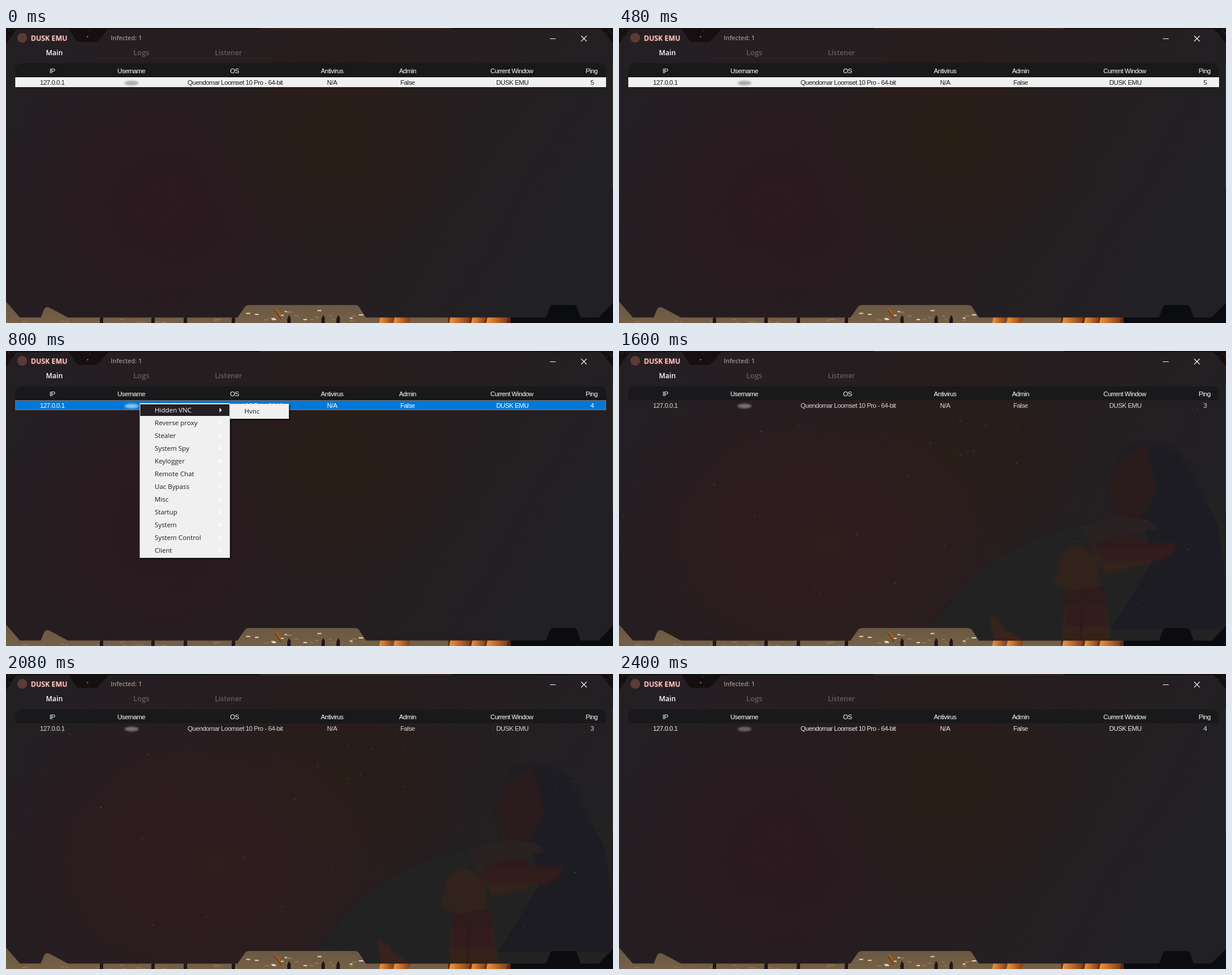
Write an HTML page that moves like this. It is 1049 by 509 pixels and loops after 3.2 s.

```html
<!DOCTYPE html>
<html lang="en">
<head>
<meta charset="utf-8">
<title>Client list</title>
<style>
html, body { margin: 0; width: 100%; height: 100%; overflow: hidden; background: #15100f; }
svg { display: block; width: 1049px; height: 509px; }
text { white-space: pre; }
.cell { font: 11.3px "Liberation Sans", Arial, sans-serif; text-anchor: middle; letter-spacing: -0.5px; }
.tab { font: 600 12px "Open Sans", sans-serif; }
.item { font: 11.3px "Open Sans", sans-serif; }
</style>
</head>
<body>
<svg id="stage" viewBox="0 0 1049 509" xmlns="http://www.w3.org/2000/svg">
  <defs>
    <linearGradient id="base" x1="0" y1=".35" x2="1" y2=".65">
      <stop offset="0" stop-color="#241f23"/>
      <stop offset=".4" stop-color="#261c1f"/>
      <stop offset=".62" stop-color="#251e20"/>
      <stop offset="1" stop-color="#212125"/>
    </linearGradient>
    <radialGradient id="plum"><stop stop-color="#2b1920"/><stop offset=".55" stop-color="#2a1a20" stop-opacity=".7"/><stop offset="1" stop-color="#261d21" stop-opacity="0"/></radialGradient>
    <radialGradient id="umber"><stop stop-color="#291e14"/><stop offset=".5" stop-color="#291d19" stop-opacity=".7"/><stop offset="1" stop-color="#261e1d" stop-opacity="0"/></radialGradient>
    <radialGradient id="wine"><stop stop-color="#301d1e"/><stop offset=".6" stop-color="#2d1d1e" stop-opacity=".7"/><stop offset="1" stop-color="#281e20" stop-opacity="0"/></radialGradient>
    <linearGradient id="skin" x2="0" y2="1"><stop stop-color="#2c1f1e"/><stop offset="1" stop-color="#362019"/></linearGradient>
    <linearGradient id="ember"><stop stop-color="#e99643"/><stop offset=".45" stop-color="#c26a28"/><stop offset="1" stop-color="#7b3b1b"/></linearGradient>
    <linearGradient id="town" x2="0" y2="1"><stop stop-color="#655541"/><stop offset="1" stop-color="#766047"/></linearGradient>
    <filter id="soft" x="-30%" y="-60%" width="160%" height="220%"><feGaussianBlur stdDeviation="1.6"/></filter>
    <filter id="haze"><feGaussianBlur stdDeviation="2"/></filter>
    <filter id="glow" x="-20%" y="-60%" width="140%" height="220%"><feDropShadow dx="0" dy="0" stdDeviation="1.8" flood-color="#c02a20"/></filter>
    <filter id="drop" x="-5%" y="-5%" width="115%" height="120%"><feDropShadow dx="2" dy="2" stdDeviation="1" flood-color="#000" flood-opacity=".6"/></filter>
    <path id="frame" d="M18 2 0 28V472L24 499.500H60L66 485Q70 479 76 483L107 499.500H400L413 481Q415 478 419 478H604Q608 478 610 481L622 499.500H933L940 482Q941 478 946 478H981Q985 478 987 482L993 499.500H1024L1049 474V27L1028 2H177L160 21Q158 24 154 24H127Q123 24 121 21L109 2Z"/>
    <clipPath id="inside"><use href="#frame"/></clipPath>
  </defs>
  <g id="scene"></g>
  <g clip-path="url(#inside)">
    <rect width="1049" height="509" fill="url(#base)"/>
    <ellipse cx="270" cy="300" rx="280" ry="260" fill="url(#plum)"/>
    <ellipse cx="570" cy="190" rx="250" ry="240" fill="url(#umber)"/>
    <g id="art">
      <ellipse cx="360" cy="330" rx="360" ry="290" fill="url(#wine)"/>
      <g filter="url(#haze)">
        <path d="M540 480Q650 310 830 300L950 240 1049 260V509H540Z" fill="#222124"/>
        <path d="M862 190Q872 150 925 158 980 165 1000 235L1035 300 1049 400V480H850L925 360 905 290Z" fill="#1f1e21"/>
        <path d="M866 186 910 162 930 240 900 292 858 283 846 240Z" fill="#2c1f1e"/>
        <path d="M815 335Q830 310 880 312L915 330 960 332Q965 352 930 362L840 385Z" fill="url(#skin)"/>
        <path d="M798 305Q850 280 915 292L935 306 840 325 815 340Z" fill="#292021"/>
        <path d="M752 400 764 350Q778 332 800 338L828 358 832 410 790 420Z" fill="#31201c"/>
        <path d="M770 416 838 404 850 500H766Z" fill="url(#skin)"/>
        <path d="M801 420 798 500" stroke="#261c1d" stroke-width="3"/>
        <path d="M641 460Q657 456 667 480L698 500H648Z" fill="#39241b"/>
      </g>
      <g id="stars"></g>
    </g>
  </g>
  <path d="M1048.5 60V275" stroke="#49392b"/>
  <path d="M157 51.5H458" stroke="#292427" stroke-dasharray="8 2"/>
  <circle cx="28" cy="17" r="8.5" fill="#5c3a38"/>
  <text class="tab" x="43" y="22" fill="#f6e4e2" filter="url(#glow)" letter-spacing=".15">DUSK EMU</text>
  <text class="tab" x="181" y="21" fill="#a78f8a" style="font-size:10.6px">Infected: 1</text>
  <text class="tab" x="69" y="47" fill="#fff">Main</text>
  <text class="tab" x="220" y="47" fill="#635e60" style="font-size:12.6px">Logs</text>
  <text class="tab" x="361" y="47" fill="#635e60">Listener</text>
  <path d="M940 18.5H950M994 13.5 1003.500 23M1003.500 13.500 994 23" stroke="#f4f4f4" stroke-width="1.1" fill="none"/>
  <path d="M16 85V73Q16 61 28 61H1025Q1037 61 1037 73V85Z" fill="#19181a"/>
  <g id="heads" fill="#fff"></g>
  <rect id="bar" x="16" y="85" width="1021" height="17"/>
  <rect id="focus" x="16.5" y="85.5" width="1020" height="16" fill="none" stroke="#ff8728" stroke-dasharray="1 1"/>
  <ellipse id="smudge" cx="217" cy="95" rx="12" ry="4" filter="url(#soft)"/>
  <g id="cells"></g>
  <g id="menu"></g>
</svg>
<script>
const $ = id => document.getElementById(id);
const NS = "http://www.w3.org/2000/svg";

function add(parent, tag, attrs, label) {
  const el = document.createElementNS(NS, tag);
  for (const key in attrs) el.setAttribute(key, attrs[key]);
  if (label !== undefined) el.textContent = label;
  parent.appendChild(el);
  return el;
}

const box = (parent, x, y, width, height, fill) =>
  add(parent, "rect", { x, y, width, height, fill });

function seeded(seed) {
  return () => (seed = seed * 16807 % 2147483647) / 2147483647;
}

function drawScene() {
  const g = $("scene"), rnd = seeded(71);
  box(g, 0, 0, 1049, 509, "#15100f");
  box(g, 440, 0, 330, 2, "#30231a");
  box(g, 0, 465, 768, 44, "url(#town)");
  for (let i = 0; i < 22; i++)
    box(g, 415 + rnd() * 195, 484 + rnd() * 22, 3 + rnd() * 6, 2, i % 2 ? "#8c765a" : "#e6d6b4");
  for (let i = 0; i < 14; i++)
    box(g, rnd() * 400, 501 + rnd() * 7, 4 + rnd() * 9, 1.5, "#8f7759");
  for (const x of [165, 254, 310, 393, 489, 548, 574])
    add(g, "path", { d: `M${x - 3} 509V502L${x} 495 ${x + 3} 500V509Z`, fill: "#201719" });
  add(g, "path", { d: "M463 485 468 484 475 493 474 502 467 494Z", fill: "#9d5b20" });
  add(g, "path", { d: "M464 486 475 502", stroke: "#2a1b18" });
  const toes = (x, w) => add(g, "path", { d: `M${x} 499H${x + w}L${x + w - 3} 509H${x - 2}Z`, fill: "url(#ember)" });
  toes(647, 24);
  toes(672, 27);
  box(g, 764, 499, 108, 10, "#5d2a17");
  toes(768, 35);
  toes(806, 24);
  toes(832, 36);
  box(g, 872, 470, 177, 39, "#0b0c10");
  for (let i = 0; i < 9; i++)
    add(g, "circle", { cx: i < 5 ? rnd() * 16 : 1030 + rnd() * 18, cy: rnd() * 20, r: .8, fill: "#574a43" });
  add(g, "circle", { cx: 141, cy: 15, r: 1.3, fill: "#77706c" });
  add(g, "circle", { cx: 145, cy: 5, r: .8, fill: "#504845" });
}

function drawStars() {
  const rnd = seeded(29);
  for (let i = 0; i < 65; i++)
    add($("stars"), "circle", {
      cx: rnd() * 1000, cy: 100 + Math.pow(rnd(), 1.4) * 350, r: .5 + rnd() * .7,
      fill: "#625054", opacity: .4 + rnd() * .5
    });
}

const columns = [
  ["IP", 80, "127.0.0.1"],
  ["Username", 216.5, ""],
  ["OS", 395, "Quendomar Loomset 10 Pro - 64-bit", 396],
  ["Antivirus", 563.5, "N/A"],
  ["Admin", 694, "False"],
  ["Current Window", 874, "DUSK EMU", 875],
  ["Ping", 1012, "5", 1013]
];

function drawTable() {
  return columns.map(([head, x, value, at = x]) => {
    add($("heads"), "text", { class: "cell", x, y: 78 }, head);
    return add($("cells"), "text", { class: "cell", x: at, y: 98 }, value);
  });
}

function drawMenu() {
  const g = $("menu");
  const panel = (x, y, width, height) => add(g, "rect", {
    x: x + .5, y: y + .5, width: width - 1, height: height - 1,
    fill: "#f0f0f0", stroke: "#dcdcdc", filter: "url(#drop)"
  });
  panel(231, 90, 156, 267);
  panel(387, 91, 102, 26);
  box(g, 232, 92, 154, 20, "#231f23");
  const items = ["Hidden VNC", "Reverse proxy", "Stealer", "System Spy", "Keylogger", "Remote Chat",
    "Uac Bypass", "Misc", "Startup", "System", "System Control", "Client"];
  items.forEach((label, i) => {
    const y = 106 + 22 * i;
    add(g, "text", { class: "item", x: 257, y, fill: i ? "#1c1c1c" : "#fff" }, label);
    add(g, "path", { d: `M369 ${y - 8}L373 ${y - 4} 369 ${y}Z`, fill: "#fff" });
  });
  add(g, "text", { class: "item", x: 412, y: 108, fill: "#1c1c1c" }, "Hvnc");
}

const HOLD = 800;
const states = [
  { bar: "#f0f0f0", ink: "#1a1a1a", smudge: "#aaa", ping: 5 },
  { bar: "#0078d7", ink: "#fff", smudge: "#8cc0ec", ping: 4, menu: true },
  { bar: "none", ink: "#ddd5d2", smudge: "#777071", ping: 3, art: true },
  { bar: "none", ink: "#eee8e6", smudge: "#686264", ping: 4 }
];

drawScene();
drawStars();
const cells = drawTable();
drawMenu();

const show = (id, on) => $(id).setAttribute("display", on ? "inline" : "none");

function render(time) {
  const s = states[Math.floor(time / HOLD) % states.length];
  $("bar").setAttribute("fill", s.bar);
  $("cells").setAttribute("fill", s.ink);
  $("smudge").setAttribute("fill", s.smudge);
  cells[6].textContent = s.ping;
  show("menu", s.menu);
  show("focus", s.menu);
  show("art", s.art);
}

const start = performance.now();
function tick() {
  render(performance.now() - start);
  requestAnimationFrame(tick);
}
tick();
</script>
</body>
</html>
```
